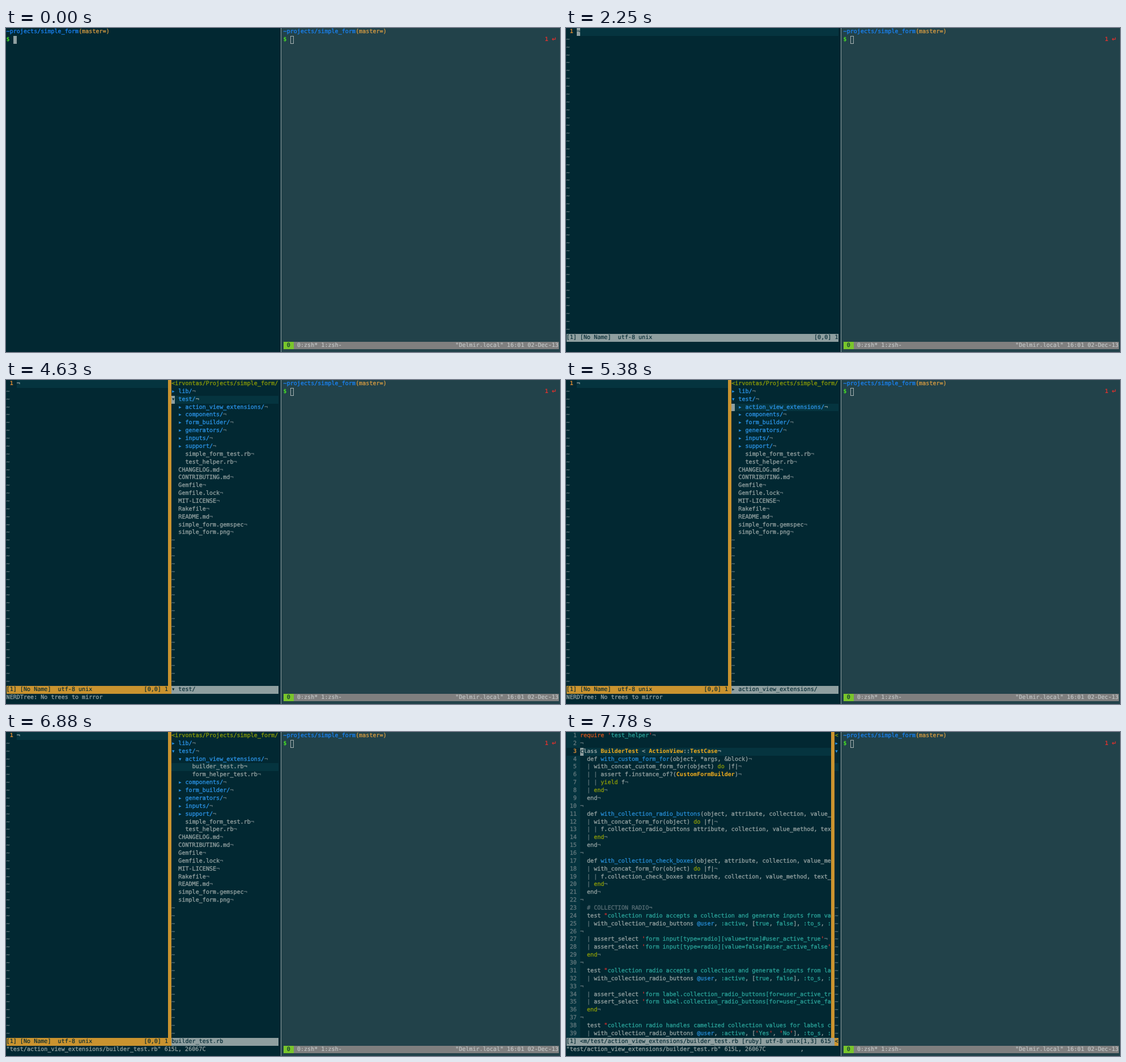
These frames come from a looping animation (978 px wide and 573 px high, 8 s). An HTML page:

```html
<!DOCTYPE html>
<html lang="en">
<head>
<meta charset="utf-8">
<title>Terminal with file tree</title>
<style>
html, body { margin: 0; width: 100%; height: 100%; overflow: hidden; background: #022832; }
body {
  position: relative; color: #93a1a1;
  font: 10.09px/13.865px "DejaVu Sans Mono", monospace;
  text-rendering: geometricPrecision; white-space: pre;
  -webkit-text-stroke: .32px;
}
div, span { position: absolute; }
span { height: 13.865px; }
i { font-style: normal; }
#left { left: 0; top: 0; width: 485px; height: 573px; }
#split { left: 485px; top: 0; width: 1px; height: 573px; background: #9aa6a8; }
#shade { left: 486px; top: 0; width: 492px; height: 573px; background: #22424a; }
#right { left: 489px; top: 0; width: 489px; height: 573px; }
.line { overflow: hidden; background: #022832; }
.hl { background: #05343f; }
.on { background: #8f9fa0; }
.nc { background: #ca932f; }
.bar { background: #7f7f7f; }
.tag { background: #79c52b; }
.box { box-sizing: border-box; border: 1px solid #a9b4b4; }
.ink { color: #022832; -webkit-text-stroke-width: .15px; }
.pale { color: #c4c8c8; -webkit-text-stroke-width: .15px; }
.dim { color: #61757a; }
.num { color: #64797e; }
.now { color: #d98b35; font-weight: bold; }
.path { color: #1a82f2; }
.git { color: #d39a42; }
.ps { color: #46dd26; font-weight: bold; }
.err { color: #dc322f; font-weight: bold; }
.enter { color: #dc322f; font-family: "DejaVu Sans", sans-serif; }
.red { color: #dc322f; }
.blue { color: #268bd2; }
.dir { color: #2b93e6; }
.cyan { color: #2aa198; }
.olive { color: #8a9a08; }
.type { color: #f3ad1d; font-weight: bold; }
.inc { color: #d4541c; }
.note { color: #586e75; }
.bold { font-weight: bold; }
.now, .ps, .err, .type, .bold { -webkit-text-stroke-width: 0; }
</style>
</head>
<body>
<div id="left"></div>
<div id="split"></div>
<div id="shade"></div>
<div id="right"></div>
<script>
const W = 6.075, H = 13.865, X = 0.6, LOOP = 8000;
const ROWS = 39, COLS = 79, TREE = 48;
const $ = id => document.getElementById(id);
const esc = s => s.replace(/&/g, '&amp;').replace(/</g, '&lt;');
const at = (r, c) => `left:${(X + c * W).toFixed(2)}px;top:${(r * H).toFixed(2)}px;`;
const put = (r, c, s, cls = '') => `<span class="${cls}" style="${at(r, c)}">${esc(s)}</span>`;
const rect = (r, c, w, cls, h = 1) =>
  `<div class="${cls}" style="${at(r, c)}width:${w * W}px;height:${h * H}px"></div>`;
const tint = (cls, s) => `<i class="${cls}">${esc(s)}</i>`;
const cursor = (r, c, ch = '') => rect(r, c, 1, 'on') + put(r, c, ch, 'ink');

const prompt = () =>
  put(0, 0, '~projects/simple_form', 'path') + put(0, 21, '(master=)', 'git') + put(1, 0, '$', 'ps');

function tildes(from, c) {
  let out = '';
  for (let r = from; r < ROWS; r++) out += put(r, c, '~', 'dim');
  return out;
}

// ---- shell and empty editor ----
const shell = (typed, r = 1, c = 2 + typed.length) => prompt() + put(1, 2, typed) + cursor(r, c);

const emptyBuffer = width =>
  rect(0, 3, width - 3, 'hl') + put(0, 1, '1', 'now') + put(0, 3, '¬') + tildes(1, 0);

const emptyStatus = (width, cls) =>
  rect(ROWS, 0, width, cls) + put(ROWS, 0, '[1] [No Name]  utf-8 unix', 'ink');

const vim = (hasCursor, keys = '') =>
  emptyBuffer(COLS) + emptyStatus(COLS, 'on') + put(ROWS, 72, '[0,0] 1', 'ink') +
  (hasCursor ? cursor(0, 3, '¬') : '') + put(40, 68, keys);

// ---- file tree ----
const ROOT = '<irvontas/Projects/simple_form/';
const FILES = ['CHANGELOG.md', 'CONTRIBUTING.md', 'Gemfile', 'Gemfile.lock', 'MIT-LICENSE',
  'Rakefile', 'README.md', 'simple_form.gemspec', 'simple_form.png'];
const DIRS = ['components/', 'form_builder/', 'generators/', 'inputs/', 'support/'];

// depth of opened folders: 0 none, 1 test, 2 action_view_extensions
function entries(open) {
  const list = [];
  const dir = (d, name, opened) => list.push({ d, name, arrow: opened ? '▾' : '▸' });
  const file = (d, name) => list.push({ d, name });
  dir(0, 'lib/');
  dir(0, 'test/', open > 0);
  if (open > 0) {
    dir(1, 'action_view_extensions/', open > 1);
    if (open > 1) ['builder_test.rb', 'form_helper_test.rb'].forEach(n => file(2, n));
    DIRS.forEach(n => dir(1, n));
    ['simple_form_test.rb', 'test_helper.rb'].forEach(n => file(1, n));
  }
  FILES.forEach(n => file(0, n));
  return list;
}

const NO_TREE = 'NERDTree: No trees to mirror';
const OPENED = '"test/action_view_extensions/builder_test.rb" 615L, 26067C';

function tree(open, sel, message = NO_TREE, hasCursor = true) {
  const list = entries(open), pick = list[sel - 1];
  let out = emptyBuffer(47) + emptyStatus(TREE, 'nc') + put(ROWS, 40, '[0,0] 1', 'ink') +
    rect(0, 47, 1, 'nc', ROWS) + rect(sel, TREE, 31, 'hl') + put(0, TREE, ROOT, 'olive');
  list.forEach(({ d, name, arrow }, i) => {
    const r = i + 1, c = TREE + 2 * d;
    if (arrow) out += put(r, c, arrow, 'dir');
    out += put(r, c + 2, name, arrow ? 'dir' : '') +
      put(r, c + 2 + name.length, '¬', r === sel ? '' : 'dim');
  });
  out += tildes(list.length + 1, TREE);
  const label = !pick ? ROOT : pick.arrow ? pick.arrow + ' ' + pick.name : pick.name;
  out += rect(ROWS, TREE, 31, 'on') + put(ROWS, TREE, label, 'ink') + put(40, 0, message);
  if (hasCursor) out += cursor(sel, TREE, !pick ? '<' : pick.arrow && !pick.d ? pick.arrow : '');
  return out;
}

// ---- opened file ----
const CODE = `require 'test_helper'

class BuilderTest < ActionView::TestCase
  def with_custom_form_for(object, *args, &block)
  | with_concat_custom_form_for(object) do |f|
  | | assert f.instance_of?(CustomFormBuilder)
  | | yield f
  | end
  end

  def with_collection_radio_buttons(object, attribute, collection, value_
  | with_concat_form_for(object) do |f|
  | | f.collection_radio_buttons attribute, collection, value_method, tex
  | end
  end

  def with_collection_check_boxes(object, attribute, collection, value_me
  | with_concat_form_for(object) do |f|
  | | f.collection_check_boxes attribute, collection, value_method, text_
  | end
  end

  # COLLECTION RADIO
  test "collection radio accepts a collection and generate inputs from va
  | with_collection_radio_buttons @user, :active, [true, false], :to_s, :

  | assert_select 'form input[type=radio][value=true]#user_active_true'
  | assert_select 'form input[type=radio][value=false]#user_active_false'
  end

  test "collection radio accepts a collection and generate inputs from la
  | with_collection_radio_buttons @user, :active, [true, false], :to_s, :

  | assert_select 'form label.collection_radio_buttons[for=user_active_tr
  | assert_select 'form label.collection_radio_buttons[for=user_active_fa
  end

  test "collection radio handles camelized collection values for labels c
  | with_collection_radio_buttons @user, :active, ['Yes', 'No'], :to_s, :`.split('\n');

const TOKENS = [
  ['dim', /^[ |]+/],
  ['note', /# .*/],
  ['str', /'[^']*'?|"[^"]*"?/],
  ['', /::/],
  ['cyan', /:\w*|\b(?:true|false)\b/],
  ['blue', /@\w+|(?<=def )\w+/],
  ['type', /\b[A-Z]\w+/],
  ['inc', /^require\b/],
  ['bold', /^class\b/],
  ['olive', /\b(?:do|yield|end)\b/],
];
const LEXER = new RegExp(TOKENS.map(([, re]) => `(${re.source})`).join('|'), 'g');

function paint(line, plainEnd) {
  let out = '', last = 0;
  for (const m of line.matchAll(LEXER)) {
    const s = m[0], cls = TOKENS[m.slice(1).findIndex(g => g !== undefined)][0];
    out += esc(line.slice(last, m.index));
    last = m.index + s.length;
    if (cls === 'str') {
      const closed = s.length > 1 && s.endsWith(s[0]);
      out += tint('red', s[0]) + tint('cyan', s.slice(1, closed ? -1 : undefined)) +
        (closed ? tint('red', s[0]) : '');
    } else {
      out += cls && !(s === 'end' && plainEnd) ? tint(cls, s) : esc(s);
    }
  }
  return out + esc(line.slice(last));
}

const CURRENT = 2;
let inDef = false;
const PAINTED = CODE.map((line, i) => {
  const opener = line.match(/^  (def|test)\b/);
  if (opener) inDef = opener[1] === 'def';
  const eol = line.length < 73 ? tint(i === CURRENT ? '' : 'dim', '¬') : '';
  return tint(i === CURRENT ? 'now' : 'num', String(i + 1).padStart(3) + ' ') +
    paint(line, inDef && line === '  end') + eol;
});

// the current line is lit beside its number, all others only in the gutter
function codeRow(r, width) {
  const [from, to] = r === CURRENT ? [4, 77] : [0, 4];
  return `<div class="line" style="${at(r, 0)}width:${width * W}px;height:${H}px">` +
    `<div class="hl" style="left:${from * W}px;top:0;width:${(to - from) * W}px;height:${H}px"></div>` +
    `<span style="left:0;top:0">${PAINTED[r]}</span></div>`;
}

function codeRows(n) {
  let out = '';
  for (let r = 0; r < n; r++) out += codeRow(r, 77);
  return out + rect(0, 77, 1, 'nc', n);
}

const halfDrawn = () => tree(2, 4, OPENED, false) + codeRows(31) + codeRow(31, 38);

const file = keys =>
  codeRows(ROWS) + cursor(CURRENT, 4, 'c') +
  rect(4, 78, 1, 'hl') + put(0, 78, '<', 'olive') + put(1, 78, '▸', 'dir') + put(2, 78, '▾', 'dir') +
  tildes(22, 78) + rect(ROWS, 0, 78, 'on') + rect(ROWS, 78, 1, 'nc') +
  put(ROWS, 0, '[1] <m/test/action_view_extensions/builder_test.rb [ruby] utf-8 unix[1,3] 615', 'ink') +
  put(ROWS, 78, '<', 'ink') + put(40, 0, OPENED) + put(40, 68, keys);

// ---- timeline ----
const STEPS = [
  [0, shell('')],
  [600, shell('vi')],
  [750, shell('vim')],
  [1050, shell('vim', 2, 0)],
  [2250, vim(true)],
  [3150, vim(true, ',')],
  [3290, vim(false)],
  [3590, tree(0, 0)],
  [4030, tree(0, 1)],
  [4330, tree(0, 2)],
  [4630, tree(1, 2)],
  [4930, tree(1, 3)],
  [5080, tree(1, 4)],
  [5380, tree(1, 3)],
  [5680, tree(2, 3)],
  [6280, tree(2, 4)],
  [6880, tree(2, 4, OPENED, false)],
  [7330, halfDrawn()],
  [7480, file('')],
  [7780, file(',')],
];

$('right').innerHTML = prompt() + rect(1, 2, 1, 'box') +
  put(1, 76, '1', 'err') + put(1, 78, '↵', 'enter') +
  rect(40, 0, 80, 'bar') + rect(40, 0, 3, 'tag') + put(40, 1, '0', 'ink') +
  put(40, 4, '0:zsh* 1:zsh-', 'pale') + put(40, 50, '"Delmir.local" 16:01 02-Dec-13', 'pale');

let shown = -1;
const start = performance.now();
function draw() {
  const t = Math.max(0, performance.now() - start) % LOOP;
  const i = STEPS.findLastIndex(([from]) => from <= t);
  if (i !== shown) $('left').innerHTML = STEPS[shown = i][1];
  requestAnimationFrame(draw);
}
draw();
</script>
</body>
</html>
```
